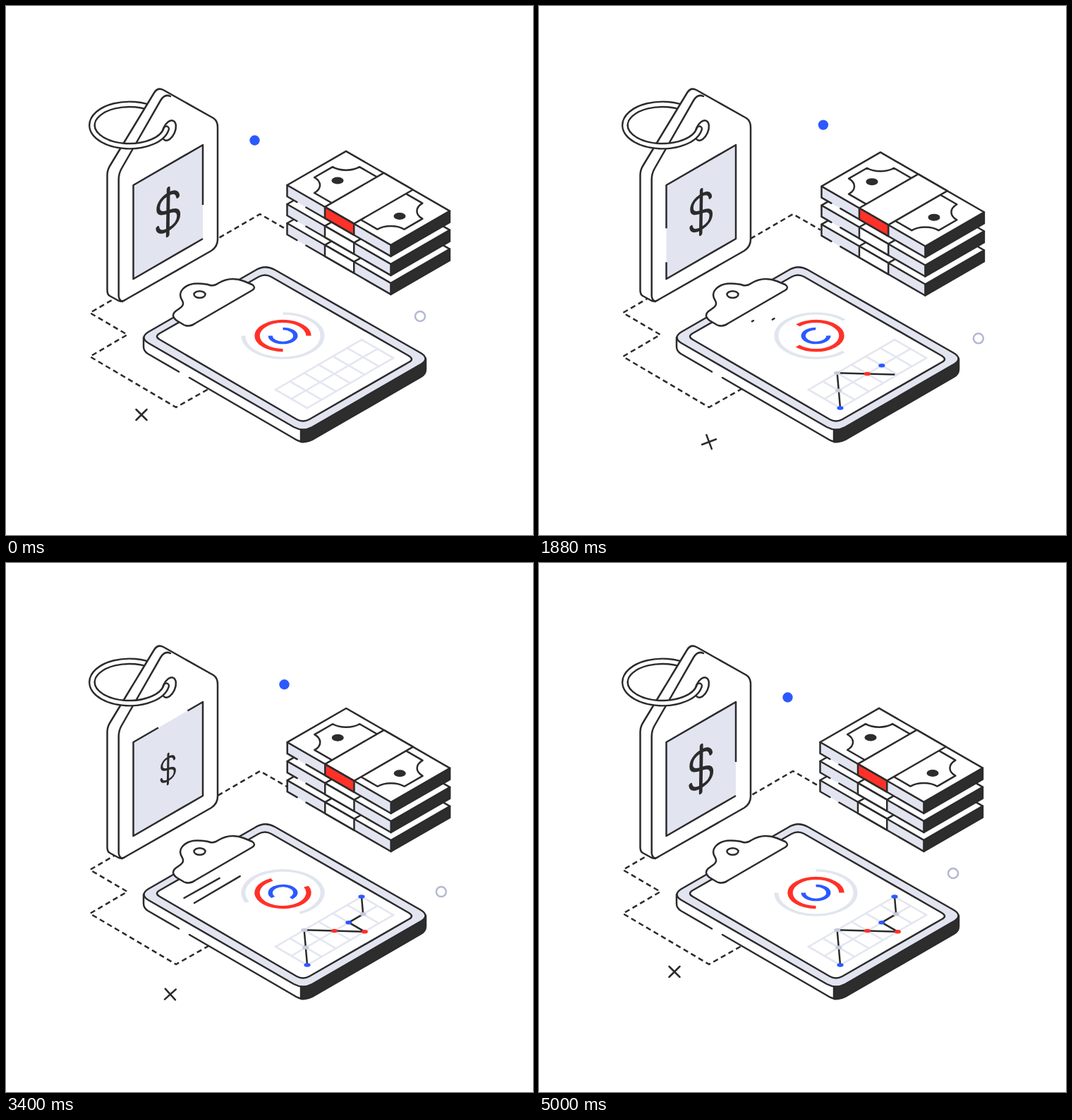
These frames come from a looping animation (747x750 px, 5040 ms). An HTML page:

```html
<!DOCTYPE html>
<html lang="en">
<head>
<meta charset="utf-8">
<title>Pricing report</title>
<style>
  html, body { margin: 0; width: 100%; height: 100%; overflow: hidden; background: #fff; }
  svg { display: block; width: 100%; height: 100%; }
  .ln { fill: none; stroke: #2b2b2b; stroke-width: 2.5; stroke-linejoin: round; stroke-linecap: round; }
  .butt { stroke-linecap: butt; }
  .w { fill: #fff; }
  .lilac { fill: #e2e4f0; }
  .dark { fill: #2d2d2d; }
  .red { fill: #ff3128; }
  .blue { fill: #2b59ff; }
  .grey { fill: #c6cadd; }
  .grid { fill: none; stroke: #e4e6f0; stroke-width: 2.6; }
  .arc { fill: none; }
  .flat { vector-effect: non-scaling-stroke; }
</style>
</head>
<body>
<svg viewBox="0 0 747 750">
  <path id="dash" class="ln butt" d="M287 543L241 569L119 497L172 466L119 435L360 295L399 317.5"/>

  <g id="tag">
    <g id="ringBack"></g>
    <path class="ln w" d="M210 123Q215 115 223 119L294 159Q300 163 300 172V331Q300 341 291 347L170 416Q164 421 158 417L147 411Q143.500 409 143.500 403V240Q143.500 233 147 227Z"/>
    <path class="ln" d="M233 128Q225 124 219 134L163.500 231Q159.700 238 159.700 246V411Q160 417 165 419"/>
    <path class="lilac" d="M180.500 254L279 197V330L180.500 387Z"/>
    <path id="frame" class="ln butt" d="M279 197V330L180.500 387V254Z"/>
    <g id="dollar" class="ln" style="stroke-width:4.8">
      <path d="M14 -14C13 -22 7 -25 0 -25C-9 -25 -14 -20 -14 -13C-14 -5 -8 -2 0 0C9 2 15 5 15 13C15 21 9 25 0 25C-8 25 -14 21 -15 14M0.500 -33L-0.500 33"/>
    </g>
    <ellipse class="ln w" cx="231" cy="176.500" rx="8.500" ry="15" transform="rotate(24 231 176.500)"/>
    <g id="ringFront"></g>
  </g>

  <g id="stack"></g>

  <g id="board">
    <path class="w" d="M195 470V487L421 619V600Z"/>
    <path class="dark" d="M418 595V619Q426 620 434 615L588 526Q595 522 595 515V500Z"/>
    <path class="ln" d="M195 470V483Q195 489 201 493L245 518.500M260 527L408 613Q421 622 434 615L588 526Q595 522 595 515V500M418 601V618"/>
    <path class="ln lilac" d="M202 462L353 375Q367 366 381 374L588 492Q601 500 588 508L434 597Q421 604 408 597L202 478Q189 470 202 462Z"/>
    <path class="ln w" d="M218 464L358 384Q367 379 376 384L571 496Q579 501 571 505L430 586Q421 591 412 586L218 473Q210 468.500 218 464Z"/>
    <path class="ln w" d="M240 433L247 428Q253 424 250 418Q244 409 250 402Q258 393 272 393.500Q284 394 288 395.500Q294 398 301 393Q318 383 337 390L349 395Q355 399 349 403L268 450Q260 456 252 452L242 446Q233 439 240 433Z"/>
    <ellipse class="ln w" cx="274.500" cy="409" rx="8" ry="4.800"/>
    <g id="arcs"></g>
    <g id="notes"></g>
    <g id="chart"></g>
  </g>

  <circle id="dot" class="blue" r="7.200"/>
  <circle id="hoop" r="7" fill="none" stroke="#b2b9d2" stroke-width="2.500"/>
  <path id="cross" class="ln" d="M-7.500 -7.500L7.500 7.500M7.500 -7.500L-7.500 7.500"/>
</svg>
<script>
const SPAN = 5000, LOOP = 5040, STEP = 40;
const $ = id => document.getElementById(id);
const set = (el, attrs) => { for (const k in attrs) el.setAttribute(k, attrs[k]); return el; };
const add = (parent, tag, attrs) =>
  set(parent.appendChild(document.createElementNS('http://www.w3.org/2000/svg', tag)), attrs);
const clamp = x => Math.max(0, Math.min(1, x));
const ease = x => { x = clamp(x); return x * x * (3 - 2 * x); };
// 0 -> 1 -> 0, n times over the span
const swing = (t, n) => {
  const x = (t / SPAN * n) % 1 * 2;
  return ease(x > 1 ? 2 - x : x);
};
const poly = pts => 'M' + pts.map(p => p.join(' ')).join('L') + 'Z';

// Key ring: top half behind the tag, bottom half through its hole
const ringAt = deg => {
  const a = deg * Math.PI / 180;
  return [175 + 53 * Math.cos(a), 169 + 29.7 * Math.sin(a)];
};
const ringPart = (id, from, to, width, stroke) => add($(id), 'path', {
  class: 'ln', style: `stroke-width:${width};stroke:${stroke}`,
  d: `M${ringAt(from)}A53 29.7 0 ${+(to - from > 180)} 1 ${ringAt(to)}`
});
ringPart('ringBack', 180, 312, 9.8, '#2b2b2b');
ringPart('ringBack', 180, 312, 4.9, '#fff');
ringPart('ringFront', 10, 180, 9.8, '#2b2b2b');
ringPart('ringFront', 10, 192, 4.9, '#fff');

// Bundles of notes: u runs down-right, v runs up-right
const U = 169.7, V = 96.4, THICK = 16, GAP = 27, COS = 0.866;
const iso = (u, v, z = 0) => [398.5 + (u + v) * COS, 254 + (u - v) / 2 + z];
const side = (a, b) => poly([iso(a, 0), iso(b, 0), iso(b, 0, THICK), iso(a, 0, THICK)]);
const band = [61.8, 109.4];
for (let i = 2; i >= 0; i--) {
  const g = add($('stack'), 'g', { transform: `translate(0 ${i * GAP})` });
  const shape = (cls, d) => add(g, 'path', { class: cls, d });
  shape('lilac', side(0, U));
  shape('ln dark', poly([iso(U, 0), iso(U, V), iso(U, V, THICK), iso(U, 0, THICK)]));
  const edge = (a, b) => `M${iso(a, 0, THICK)}L${iso(b, 0, THICK)}`;
  shape('ln', `M${iso(0, 0)}L${iso(0, 0, THICK)}` + edge(0, 16) + edge(31, U));
  shape('ln w', poly([iso(0, 0), iso(0, V), iso(U, V), iso(U, 0)]));
  if (!i) {
    const m = 11.3, r = 22, x = U - m, y = V - m;
    add(g, 'path', {
      class: 'ln flat', transform: `matrix(${COS} .5 ${COS} -.5 398.5 254)`,
      d: `M${m + r} ${m}H${x - r}A${r} ${r} 0 0 0 ${x} ${m + r}V${y - r}A${r} ${r} 0 0 0 ${x - r} ${y}` +
         `H${m + r}A${r} ${r} 0 0 0 ${m} ${y - r}V${m + r}A${r} ${r} 0 0 0 ${m + r} ${m}Z`
    });
    for (const [cx, cy] of [[470, 247.5], [558, 298]])
      add(g, 'ellipse', { class: 'dark', cx, cy, rx: 8.5, ry: 5 });
  }
  shape('ln w', poly([iso(band[0], 0), iso(band[0], V), iso(band[1], V), iso(band[1], 0)]));
  shape(i ? 'ln w' : 'ln red', side(...band));
}

// Three turning 270 degree arcs: radius, width, colour, first angle, turns
const arcs = [
  [56, 6, '#e1e5ee', -90, 1],
  [36.5, 7.4, '#ff3128', 90, 1],
  [17.8, 6.4, '#2b59ff', -90, -2]
].map(([r, width, stroke, from, turns]) => ({
  from, turns,
  el: add($('arcs'), 'circle', {
    class: 'arc', r, stroke, 'stroke-width': width, pathLength: 360, 'stroke-dasharray': '270 90'
  })
}));

// Two written lines
const notes = [[252.5, 475, 304, 446], [267, 482, 333.5, 443]]
  .map(p => ({ p, el: add($('notes'), 'path', { class: 'ln' }) }));

// Chart: 6 x 2 cells
const cell = (c, r) => [382 + 20.33 * c + 22.5 * r, 544 - 11.83 * c + 13 * r];
let gridPath = '';
for (let r = 0; r <= 2; r++) gridPath += `M${cell(0, r)}L${cell(6, r)}`;
for (let c = 0; c <= 6; c++) gridPath += `M${cell(c, 0)}L${cell(c, 2)}`;
add($('chart'), 'path', { class: 'grid', 'stroke-linecap': 'square', d: gridPath });

// column, row, colour, time of appearance
const nodes = [
  [0, 2, 'blue', 20], [1, 1, 'grey', 360], [2, 0, 'grey', 720], [3, 1, 'red', 1160],
  [4, 1, 'blue', 1560], [4, 2, 'red', 1900], [5, 1, 'grey', 2250], [6, 0, 'blue', 2600]
];
const route = [0, 1, 2, 3, 5, 4, 6, 7].map(i => cell(nodes[i][0], nodes[i][1]));
const line = add($('chart'), 'path', { class: 'ln butt', d: 'M' + route.join('L') });
const lineLen = line.getTotalLength();
const dots = nodes.map(([c, r, cls, at]) => {
  const [cx, cy] = cell(c, r);
  return { at, el: add($('chart'), 'ellipse', { class: cls, cx, cy }) };
});

const frameLen = $('frame').getTotalLength(), HOLE = 48;
const DASH = 12.28;

function draw(t) {
  const k = t / SPAN, away = swing(t, 1), beat = swing(t, 3), pulse = swing(t, 5);

  set($('dot'), { cx: 352.5 + 59.6 * away, cy: 190.5 - 25.9 * away });
  set($('hoop'), { cx: 587 + 42.4 * away, cy: 440 + 37 * away });
  set($('cross'), { transform: `translate(${192 + 58 * away} ${579.5 + 45.5 * away}) rotate(${360 * ease(k)})` });

  set($('stack'), { transform: `translate(${12.1 * beat} ${10 * beat})` });
  set($('dollar'), { transform: `translate(229.7 292) scale(${1 - 0.4 * pulse}) skewY(-30)` });

  set($('dash'), { 'stroke-dasharray': `7.4 ${DASH - 7.4}`, 'stroke-dashoffset': -DASH * (10 * k + 0.12) });
  set($('frame'), {
    'stroke-dasharray': `${frameLen - HOLE} ${HOLE}`,
    'stroke-dashoffset': -(85 + HOLE + k * frameLen)
  });

  for (const { el, from, turns } of arcs)
    set(el, { transform: `translate(392.5 467.5) scale(1 .565) rotate(${from + 360 * turns * k})` });

  const w = t % 2500, head = ease(w / 1000), tail = ease((w - 1000) / 1000);
  for (const { p: [x, y, x2, y2], el } of notes) {
    const at = s => `${x + (x2 - x) * s} ${y + (y2 - y) * s}`;
    set(el, { d: head > tail ? `M${at(tail)}L${at(head)}` : '' });
  }

  set(line, { 'stroke-dasharray': `${lineLen * clamp(t / 3000)} ${lineLen * 2}` });
  line.style.display = t ? '' : 'none';
  for (const { el, at } of dots) {
    const s = ease((t - at) / 200);
    set(el, { rx: 4.6 * s, ry: 2.7 * s });
  }
}

let start;
function tick(now) {
  start ??= now;
  const t = Math.floor(((now - start) % LOOP) / STEP) * STEP;
  draw(Math.min(t, SPAN));
  requestAnimationFrame(tick);
}
draw(0);
requestAnimationFrame(tick);
</script>
</body>
</html>
```
